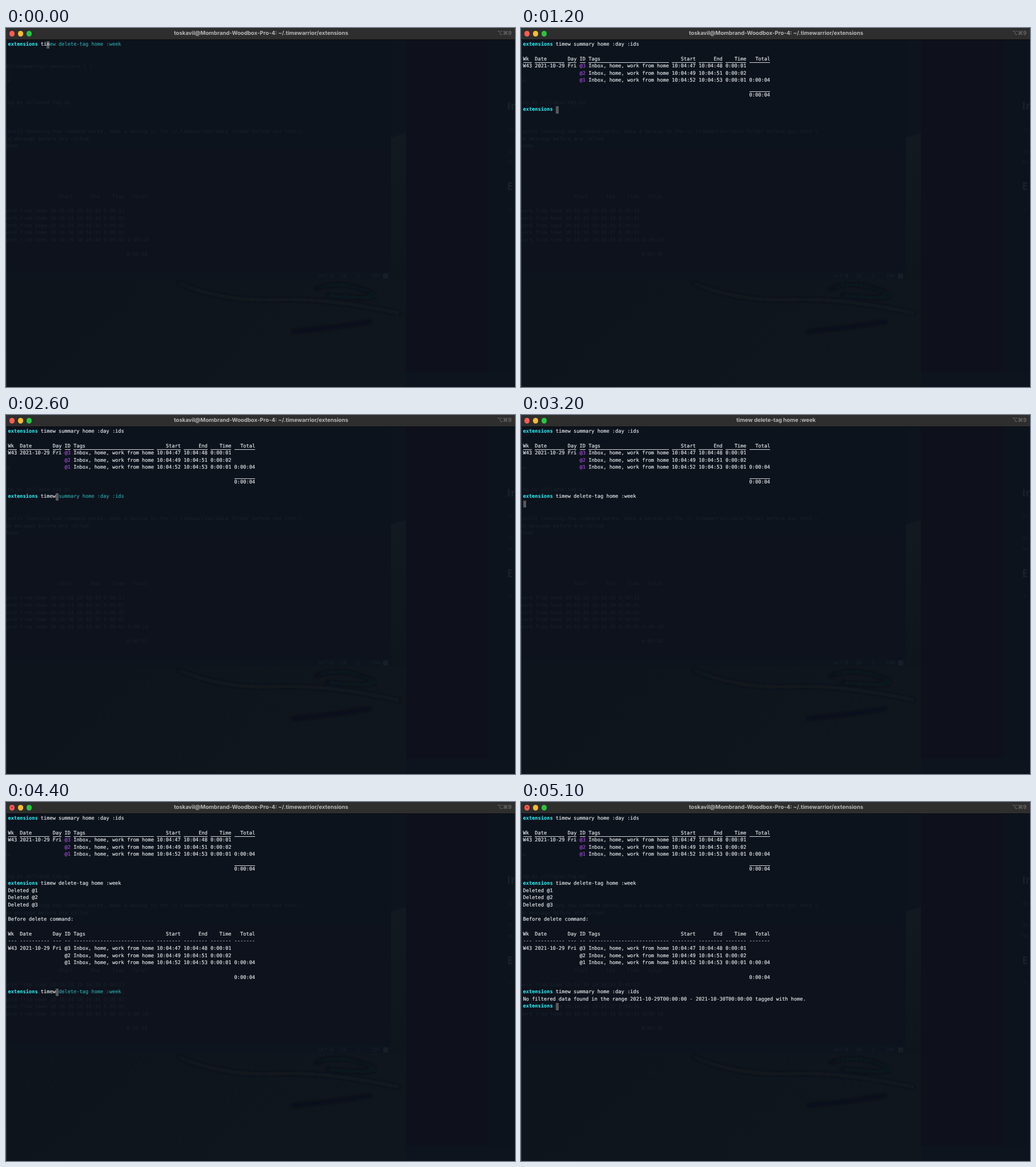
These frames come from a looping animation (891 px wide and 629 px high, 5.2 s). An HTML page:

```html
<!DOCTYPE html>
<html lang="en">
<head>
<meta charset="utf-8">
<title>Terminal session</title>
<style>
html, body { margin: 0; width: 100%; height: 100%; overflow: hidden; background: #0e141d; }
#stage { position: relative; width: 891px; height: 629px; overflow: hidden; text-rendering: geometricPrecision; }
#back { position: absolute; left: 0; top: 0; }
#back text, #term { font: 8.66px "DejaVu Sans Mono", "Liberation Mono", monospace; white-space: pre; }
#back .page { font: 9px "Open Sans", sans-serif; }
#back .head { font: bold 19px "Open Sans", sans-serif; }
#bar { position: absolute; left: 0; top: 0; width: 891px; height: 20px; background: #2e2e2e;
  border-bottom: 1px solid #07090d; font: bold 9.6px/20px Inter, "DejaVu Sans", sans-serif; color: #b7b7b7; }
#title { position: absolute; left: 1px; width: 891px; text-align: center; white-space: pre; }
#keys { position: absolute; right: 6px; color: #717171; font-weight: 500; }
#bar i { position: absolute; top: 5px; width: 9.5px; height: 9.5px; border-radius: 50%; }
#dot { position: absolute; left: 9px; top: 8px; width: 3px; height: 3px; border-radius: 50%; background: #8f1d17; }
#term { position: absolute; left: 3.5px; top: 23.2px; color: #eceef0; font-variant-ligatures: none;
  -webkit-text-stroke: 0.15px; }
#term div { height: 12.66px; line-height: 12.66px; }
#term b { color: #2bdfe4; }
#term u { display: inline-block; text-decoration: none; box-shadow: inset 0 -1px #d3d5d8; }
#term .id { color: #a64bd8; }
#term .hint { color: #2ba5aa; }
#term .cur { display: inline-block; background: #55585d; color: #c9cccf; }
</style>
</head>
<body>
<div id="stage">
  <svg id="back" width="891" height="629">
    <defs>
      <linearGradient id="rock" x1="0" y1="0" x2="1" y2="0.3">
        <stop offset="0" stop-color="#0e141c"/>
        <stop offset="1" stop-color="#10161e"/>
      </linearGradient>
      <linearGradient id="fade" x1="0" y1="0" x2="0" y2="1">
        <stop offset="0" stop-color="#131921"/>
        <stop offset="1" stop-color="#0f151d"/>
      </linearGradient>
      <filter id="soft"><feGaussianBlur stdDeviation="3"/></filter>
    </defs>
    <rect y="20" width="891" height="609" fill="#0e141d"/>
    <rect y="440" width="700" height="189" fill="url(#rock)"/>
    <g filter="url(#soft)" fill="none" stroke="#12181f" stroke-width="3">
      <path d="M300 446Q380 480 470 476T690 500"/>
      <path d="M540 458Q580 440 630 460T560 468" stroke="#0c1219"/>
      <path d="M500 532Q570 526 640 514" stroke="#0a1017"/>
    </g>
    <path d="M674 192L700 184V442H674Z" fill="url(#fade)"/>
    <rect y="20" width="674" height="420" fill="#0d131d"/>
    <rect y="212" width="674" height="215" fill="#0d121c"/>
    <rect y="427" width="674" height="13" fill="#0d141d"/>
    <rect x="700" y="20" width="191" height="582" fill="#0e111b"/>
    <rect x="845" y="20" width="46" height="582" fill="#0d131c"/>
    <g id="ghost" fill="#1b222c"></g>
    <rect x="660" y="430" width="9" height="9" fill="#171e27"/>
    <g fill="#19212a">
      <text class="head" x="877" y="143">In</text>
      <text class="page" x="878" y="181">To</text>
      <text class="page" x="878" y="219">To</text>
      <text class="page" x="878" y="238">Yo</text>
      <text class="head" x="877" y="284">E</text>
      <text class="page" x="880" y="323">^</text>
    </g>
    <rect y="20" width="1" height="609" fill="#353a42"/>
  </svg>
  <div id="bar">
    <i style="left:5.75px;background:#fe5b52"></i>
    <i style="left:20.75px;background:#fdbb2d"></i>
    <i style="left:35.75px;background:#29c63f"></i>
    <span id="dot"></span>
    <span id="title"></span>
    <span id="keys">⌥⌘9</span>
  </div>
  <div id="term"></div>
</div>
<script>
const LOOP = 5200;
const HOME = 'toskavil@Mombrand-Woodbox-Pro-4: ~/.timewarrior/extensions';
const SUM = 'timew summary home :day :ids';
const DEL = 'timew delete-tag home :week';
const $ = id => document.getElementById(id);

// Faint window showing through the terminal: x, y, text
const GHOST = [
  [0, 67, 'e(/timewarrior-extensions ) ('],
  [-2, 92, 'ho'],
  [-2, 130, 'ing.py collapse-tag.py'],
  [-2, 181, '(until learning how command works, make a backup to the ~/.timewarrior/data folder before you test.\\'],
  [-1, 194, 'on message before are called'],
  [0, 206, 'home'],
  [92, 295, 'Start'], [149, 295, 'End'], [186, 295, 'Time'], [222, 295, 'Total'],
  [-1, 320, 'work from home 10:16:20 10:16:33 0:00:13'],
  [-1, 333, 'work from home 10:16:33 10:16:34 0:00:01'],
  [-1, 346, 'work from home 10:16:34 10:16:36 0:00:02'],
  [-1, 358, 'work from home 10:16:36 10:16:37 0:00:01'],
  [-1, 371, 'work from home 10:16:39 10:16:40 0:00:01 0:00:18'],
  [211, 396, '0:00:18'],
  [547, 434, 'utf-8'], [586, 434, '26'], [614, 434, '1'], [639, 434, '20%']
];
for (const [x, y, words] of GHOST) {
  const t = document.createElementNS('http://www.w3.org/2000/svg', 'text');
  t.setAttribute('x', x);
  t.setAttribute('y', y + 3);
  t.textContent = words;
  $('ghost').append(t);
}

// Table rows on the character grid
const WIDTHS = [3, 10, 3, 2, 27, 8, 8, 7, 7];
const HEADS = ['Wk', 'Date', 'Day', 'ID', 'Tags', 'Start', 'End', 'Time', 'Total'];
const same = s => s;
const row = (cells, wrap = same) => WIDTHS.map((w, i) => {
  const s = cells[i] || '';
  return wrap(i < 5 ? s.padEnd(w) : s.padStart(w), i);
}).join(' ');
const entry = (day, id, start, end, time, total) =>
  [...day, id, 'Inbox, home, work from home', '10:04:' + start, '10:04:' + end, time, total];
const ENTRIES = [
  entry(['W43', '2021-10-29', 'Fri'], '@3', 47, 48, '0:00:01'),
  entry(['', '', ''], '@2', 49, 51, '0:00:02'),
  entry(['', '', ''], '@1', 52, 53, '0:00:01', '0:00:04')
];
const TOTAL = '0:00:04'.padStart(83);
const under = s => `<u>${s}</u>`;
const tint = (s, i) => i === 3 ? `<span class="id">${s}</span>` : s;
const PROMPT = '<b>extensions</b> ';

const LOG = [
  PROMPT + SUM, '',
  row(HEADS, under),
  ...ENTRIES.map(e => row(e, tint)),
  ' '.repeat(76) + under(' '.repeat(7)),
  TOTAL, '',
  PROMPT + DEL,
  'Deleted @1', 'Deleted @2', 'Deleted @3', '',
  'Before delete command:', '',
  row(HEADS),
  WIDTHS.map(w => '-'.repeat(w)).join(' '),
  ...ENTRIES.map(e => row(e)),
  '', TOTAL, '',
  PROMPT + SUM,
  'No filtered data found in the range 2021-10-29T00:00:00 - 2021-10-30T00:00:00 tagged with home.'
];

// time, finished lines, command on the prompt, typed characters
const typing = (line, cmd, list) => list.map(([at, n]) => [at, line, cmd, n]);
// time, finished lines, running command
const STEPS = [
  ...typing(0, DEL, [[0, 2], [300, 3], [400, 4], [600, 5], [700, 6]]),
  ...typing(0, SUM, [[800, 7], [900, 28]]),
  [1000, 1, SUM], [1100, 9, SUM],
  ...typing(9, SUM, [[1200, 0], [1500, 1], [1800, 2], [2200, 3], [2300, 4], [2600, 5], [2700, 6]]),
  ...typing(9, DEL, [[2800, 7], [3100, 27]]),
  [3200, 10, DEL], [3300, 11, DEL], [3400, 12, DEL], [3500, 13, DEL],
  ...typing(24, DEL, [[3600, 0], [3900, 1], [4000, 2], [4200, 3], [4300, 4], [4400, 5], [4500, 6]]),
  ...typing(24, SUM, [[4600, 7], [4700, 28]]),
  [4800, 25, SUM], [4900, 26, SUM],
  ...typing(26, SUM, [[5100, 0]])
];

const cursor = c => `<span class="cur">${c || ' '}</span>`;
function input(cmd, n) {
  if (n === undefined) return cursor();
  const rest = n ? cmd.slice(n) : '';
  return PROMPT + cmd.slice(0, n) + cursor(rest[0]) + `<span class="hint">${rest.slice(1)}</span>`;
}

function draw([at, lines, cmd, n]) {
  const rows = [...LOG.slice(0, lines), input(cmd, n)];
  $('term').innerHTML = rows.map(r => `<div>${r}</div>`).join('');
  $('title').textContent = n === undefined ? cmd : HOME;
  $('dot').style.opacity = at >= 3600 ? 0.7 : 0;
}

let shown;
const begin = performance.now();
function tick() {
  const t = (performance.now() - begin) % LOOP;
  const step = STEPS.filter(s => s[0] <= t).pop();
  if (step !== shown) draw(shown = step);
  requestAnimationFrame(tick);
}
tick();
</script>
</body>
</html>
```
